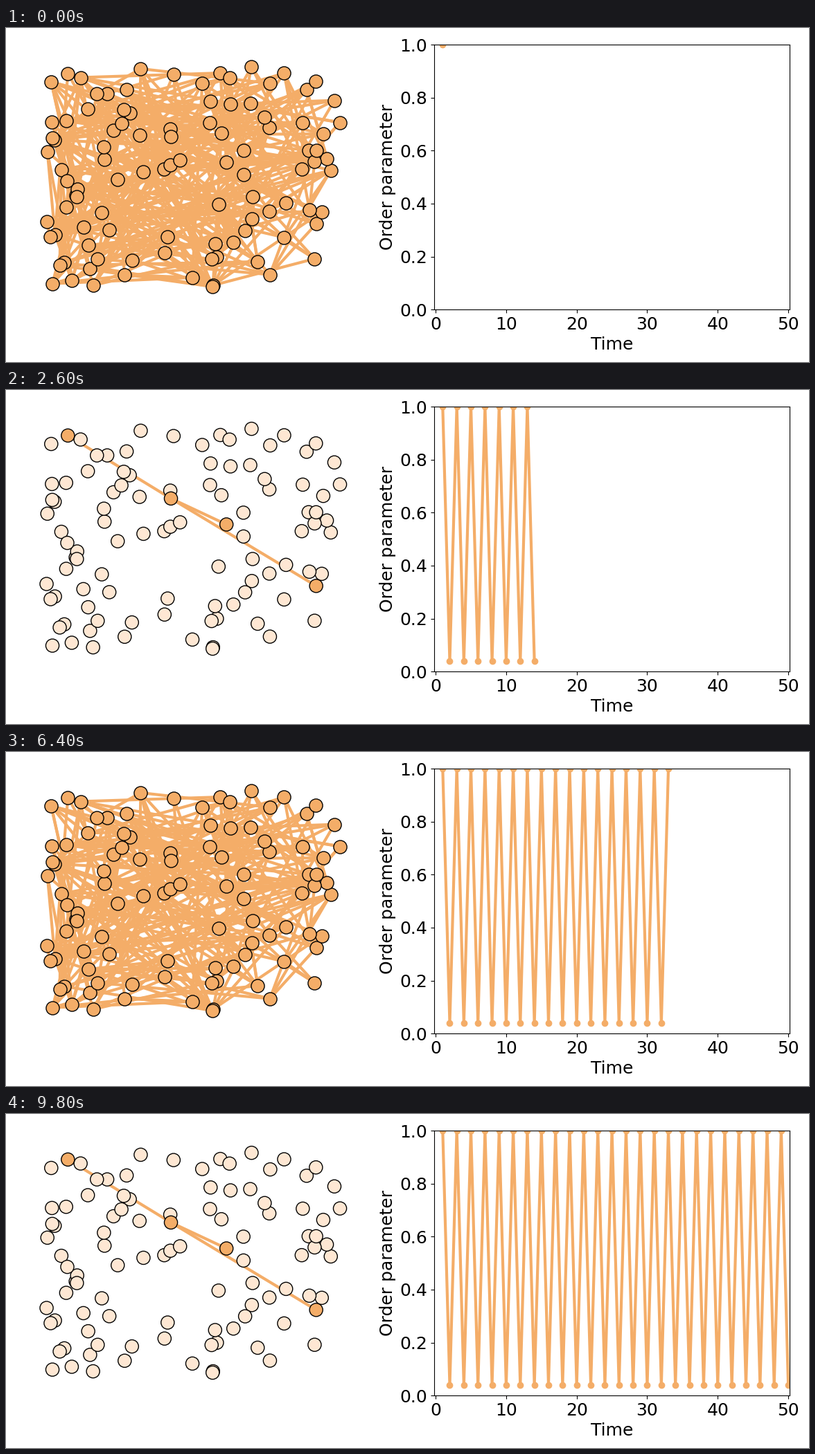
Write a matplotlib script that moves like this. It is 1159x483 px and loops after 10 s.

```python
from itertools import combinations

import numpy as np
import matplotlib.pyplot as plt
from matplotlib.animation import FuncAnimation
from matplotlib.collections import LineCollection

W, H, DPI = 1159, 483, 100
STEPS = 50
NODES = 100
FULL, REDUCED = 300, 255  # links shown at the start and on later odd steps
ORANGE, PALE = "#f4ad68", "#fee7d3"

plt.rcParams["font.family"] = "DejaVu Sans"
plt.rcParams["font.size"] = 18

# Node layout in stage pixels, y pointing down
unit = np.random.RandomState(1).rand(NODES, 2)
pos = np.array([58.5, 378.1]) + unit * [428.3, -322.85]


def nearest(x, y):
    return int(np.argmin(np.hypot(pos[:, 0] - x, pos[:, 1] - y)))


# The hub and its three neighbours stay active on even steps
hub = nearest(238, 157)
spokes = [nearest(89, 66), nearest(318, 195), nearest(448, 284)]
core = [hub, *spokes]
core_fill = [ORANGE if i in core else PALE for i in range(NODES)]

# Hub links come first, followed by random pairs
pairs = list(combinations(range(NODES), 2))
picks = np.random.RandomState(7).choice(len(pairs), FULL - len(spokes),
                                        replace=False)
links = [(hub, s) for s in spokes] + [pairs[k] for k in picks]
segments = [pos[list(link)] for link in links]

fig = plt.figure(figsize=(W / DPI, H / DPI), dpi=DPI, facecolor="white")

# Network panel
net = fig.add_axes([0, 0, 1, 1])
net.set_xlim(0, W)
net.set_ylim(H, 0)
net.axis("off")
edges = LineCollection([], colors=ORANGE, linewidths=3, zorder=1)
net.add_collection(edges, autolim=False)
dots = net.scatter(pos[:, 0], pos[:, 1], s=190, c=ORANGE,
                   edgecolors="black", linewidths=1, zorder=2)

# Order parameter panel
LEFT, RIGHT, TOP, BOTTOM = 618.1, 1131.1, 24.1, 407.1
chart = fig.add_axes([LEFT / W, 1 - BOTTOM / H,
                      (RIGHT - LEFT) / W, (BOTTOM - TOP) / H])
chart.set_xlim(-0.2, 50.2)
chart.set_ylim(0, 1)
chart.set_xticks(range(0, 51, 10))
chart.set_xlabel("Time")
chart.set_ylabel("Order parameter")
curve, = chart.plot([], [], "o-", color=ORANGE, lw=3, ms=6)

time = np.arange(1, STEPS + 1)
order = np.where(time % 2 == 1, 1.0, len(core) / NODES)


def draw(i):
    if i % 2:
        shown, fill = len(spokes), core_fill
    else:
        shown, fill = (REDUCED if i else FULL), ORANGE
    edges.set_segments(segments[:shown])
    dots.set_facecolor(fill)
    curve.set_data(time[:i + 1], order[:i + 1])
    return edges, dots, curve


anim = FuncAnimation(fig, draw, frames=STEPS, interval=200,
                     repeat=True, repeat_delay=0)
plt.show()
```
